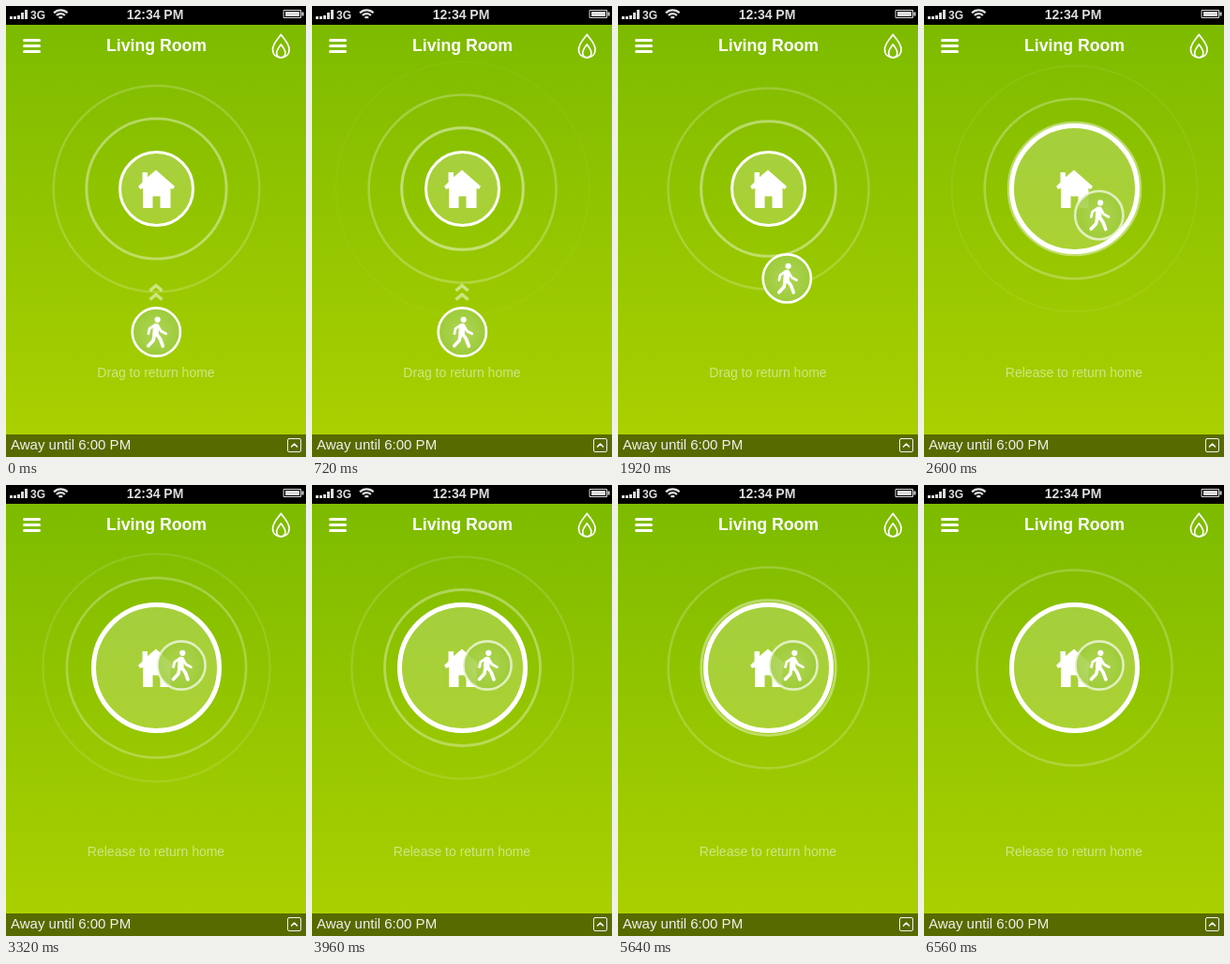
Animation, 320 px wide and 480 px high, one loop 6.6 s. Source, as an HTML page with a canvas:

```html
<!DOCTYPE html>
<html lang="en">
<head>
<meta charset="utf-8">
<style>
html, body { margin: 0; width: 100%; height: 100%; overflow: hidden; background: #95c600; }
canvas { display: block; }
</style>
</head>
<body>
<canvas id="stage" width="320" height="480"></canvas>
<script>
const c = document.getElementById('stage').getContext('2d');
const LOOP = 6600, CX = 160.5, CY = 194.5;
const SPEED = 0.0352, GAP = 35.2, FADE_R = 137;
const DRAG = 1000, DRAG_TIME = 2240;   // walker's path
const ENTER = 2240, SETTLED = 2520;    // home circle grows
const FONT = 'px "Liberation Sans", Arial, sans-serif';

const white = a => `rgba(255,255,255,${a})`;
const clamp = x => Math.max(0, Math.min(1, x));
const smooth = x => (x = clamp(x), x * x * (3 - 2 * x));
const mix = (a, b, p) => a + (b - a) * p;

function stops(g, ...colors) {
  colors.forEach((color, i) => g.addColorStop(i / (colors.length - 1), color));
  return g;
}

function gradient(y0, y1, ...colors) {
  return stops(c.createLinearGradient(0, y0, 0, y1), ...colors);
}

function rect(x, y, w, h, fill = '#fff') {
  c.fillStyle = fill;
  c.fillRect(x, y, w, h);
}

function disc(x, y, r, fill) {
  c.beginPath();
  c.arc(x, y, r, 0, 7);
  c.fillStyle = fill;
  c.fill();
}

function ring(x, y, r, width, color, from = 0, to = 7) {
  c.beginPath();
  c.arc(x, y, r, from, to);
  c.lineWidth = width;
  c.strokeStyle = color;
  c.stroke();
}

function line(points, width, color = '#fff') {
  c.beginPath();
  points.forEach(p => c.lineTo(...p));
  c.lineWidth = width;
  c.strokeStyle = color;
  c.stroke();
}

function text(s, x, y, font, align = 'center', color = '#fff') {
  c.font = font + FONT;
  c.textAlign = align;
  c.fillStyle = color;
  c.fillText(s, x, y);
}

function statusBar() {
  const grey = '#dcdcdc';
  rect(0, 0, 320, 20, '#000');
  [3, 3, 4, 7, 10].forEach((h, i) => rect(4 + i * 4, 14 - h, 3, h, grey));
  text('3G', 26, 14, 'bold 12', 'left', grey);
  c.lineCap = 'butt';
  for (const r of [2.5, 6.3, 10.2]) ring(58.3, 14.5, r, 2.3, grey, -2.36, -0.78);
  c.lineCap = 'round';
  text('12:34 PM', 159, 14, 'bold 14', 'center', grey);
  c.lineWidth = 1;
  c.strokeStyle = grey;
  c.strokeRect(296.5, 4.5, 18, 8);
  rect(298, 6, 15, 5, grey);
  rect(315.5, 6.5, 2, 4, grey);
}

function drop(top, bottom, w) {
  const h = bottom - top, x = 293.3;
  c.beginPath();
  for (const side of [w, -w]) {
    c.moveTo(x, top);
    c.bezierCurveTo(x + side * 0.45, top + h * 0.22, x + side, top + h * 0.4, x + side, top + h * 0.65);
    c.bezierCurveTo(x + side, top + h * 0.88, x + side * 0.55, bottom, x, bottom);
  }
  c.lineWidth = 1.7;
  c.strokeStyle = '#fff';
  c.stroke();
}

function header() {
  for (const y of [36.5, 42.5, 48.5]) line([[19.5, y], [35.5, y]], 3);
  text('Living Room', 160.5, 48, 'bold 17.7');
  drop(30.5, 54.8, 8.8);
  drop(41, 54.8, 4.6);
}

function footer() {
  rect(0, 456, 320, 24, 'rgba(0,0,0,0.49)');
  text('Away until 6:00 PM', 5, 472, '15', 'left', '#f2f2ea');
  c.lineWidth = 1;
  c.strokeStyle = '#f2f2ea';
  c.beginPath();
  c.roundRect(300.5, 460.5, 14, 14, 1.5);
  c.stroke();
  line([[304.5, 469], [307.5, 466], [310.5, 469]], 1.5);
}

function pulses(t, homeR) {
  const pulse = r => {
    if (r < homeR || r > FADE_R) return;
    const far = (FADE_R - r) / 97;
    const alpha = 0.02 + 0.58 * far * clamp((r - 42) / 10);
    ring(CX, CY, r, 2.1 + 1.3 * far, white(alpha));
  };
  for (let k = -7; k < 4; k++) {
    const early = 39.4 + SPEED * t + GAP * k;
    const atSettled = early + SPEED * (SETTLED - t);
    if (t < SETTLED || atSettled > 69) pulse(early);
    // a second train leaves the enlarged circle
    if (t >= SETTLED && k <= 0) pulse(95.6 + SPEED * (t - 3320) + GAP * k);
  }
}

function home(r, grow) {
  disc(CX, CY, r - 1, gradient(CY - r, CY + r, white(0.24), white(0.2)));
  const w = mix(3, 5, grow);
  ring(CX, CY, r - w / 2, w, '#fff');
  c.fillStyle = '#fff';
  c.beginPath();
  [[160, 174.5], [180, 192], [178, 195], [175.5, 194], [175.5, 215], [164.5, 215],
   [164.5, 202.5], [156.5, 202.5], [156.5, 215], [146, 215], [146, 194], [143, 195],
   [141, 192], [145.5, 187.5], [145.5, 177], [151, 177], [151, 182]]
    .forEach(p => c.lineTo(...p));
  c.closePath();
  c.fill();
}

function walker(x, y, inside) {
  c.save();
  c.translate(x, y);
  c.globalAlpha = mix(1, 0.86, inside);
  disc(0, 0, 26, stops(c.createRadialGradient(0, 0, 0, 0, 0, 26), '#b0d558', '#9ccb38'));
  c.globalAlpha = mix(1, 0.68, inside);
  ring(0, 0, 25.6, 2.6, '#fff');
  c.globalAlpha = 1;
  disc(1.3, -13.2, 3.1, '#fff');
  line([[-0.2, -6], [-0.8, 2]], 6.4);
  line([[1.5, -7], [5, -1], [10.3, 1.8]], 2.7);
  line([[-2, -7.2], [-7.2, -3.6], [-8.4, 1.8]], 2.7);
  line([[0.3, 2], [4.2, 7.5], [7, 15]], 3.6);
  line([[-1.8, 2], [-3.2, 9], [-8.6, 14.7]], 3.6);
  c.restore();
}

function draw(t) {
  const grow = smooth((t - ENTER) / (SETTLED - ENTER));
  const homeR = mix(40.5, 69.5, grow);
  const p = smooth((t - DRAG) / DRAG_TIME);

  rect(0, 0, 320, 480, gradient(20, 456, '#7dbb00', '#aad000'));
  c.lineCap = c.lineJoin = 'round';
  pulses(t, homeR);
  home(homeR, grow);

  const hint = 1 - clamp((t - DRAG) / 200);
  c.lineJoin = 'miter';
  c.lineCap = 'butt';
  for (const y of [303, 312.5])
    line([[153.5, y], [160, y - 5.5], [166.5, y]], 3.6, white(0.5 * hint));
  c.lineJoin = c.lineCap = 'round';

  const x = 160.3 + 26.7 * (1 - (1 - p) ** 3);
  walker(x, 347 - 155 * p, grow);
  text(t < ENTER + 80 ? 'Drag to return home' : 'Release to return home',
    160, 395, '14', 'center', white(0.5));

  statusBar();
  header();
  footer();
}

const start = performance.now();
function tick() {
  draw((performance.now() - start) % LOOP);
  requestAnimationFrame(tick);
}
tick();
</script>
</body>
</html>
```
